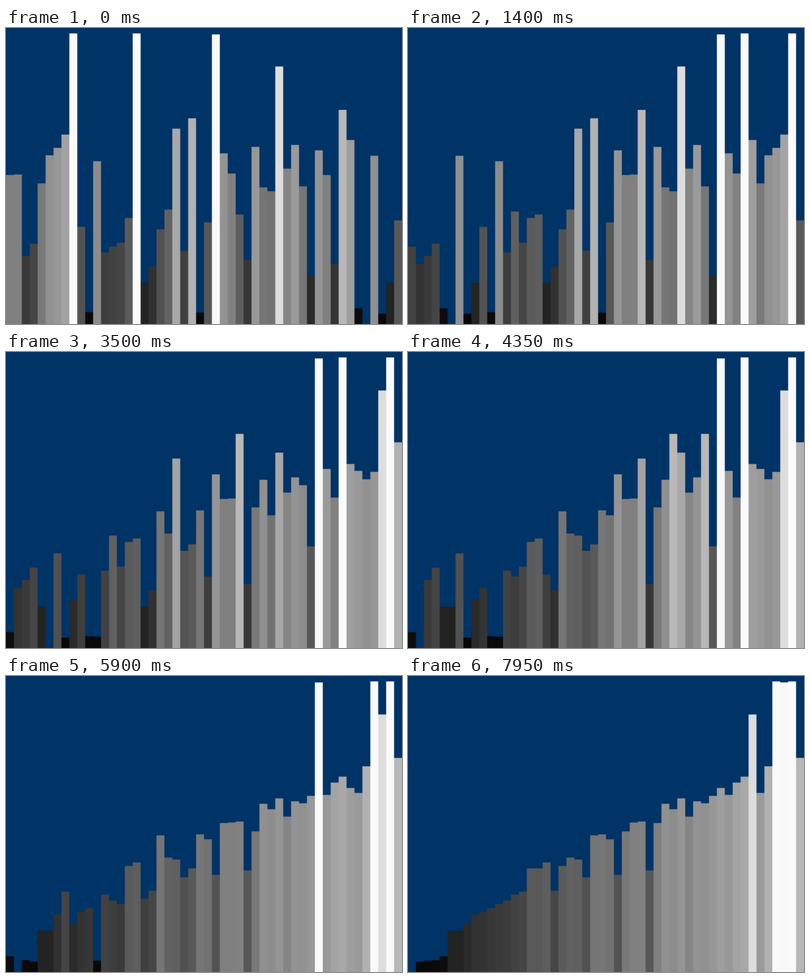
These frames come from a looping animation (740x555 px, 8000 ms). A matplotlib script:

```python
import numpy as np
import matplotlib.pyplot as plt
from matplotlib.animation import FuncAnimation

WIDTH, HEIGHT, DPI = 740, 555, 100
FRAMES, INTERVAL = 160, 50
STEP, LEAD = 40, 20    # ms per sorting operation, ms already elapsed at start
BAR, ROWS = 16, 600    # the scene is painted at 800 x 600, then scaled down
SKY = (0, 51, 102)

# The unsorted input; every later picture follows from the algorithm.
START = [302, 303, 138, 163, 285, 342, 357, 384, 589, 197, 24, 330, 145,
         157, 165, 215, 589, 84, 117, 192, 232, 396, 149, 417, 23, 206,
         587, 346, 305, 222, 130, 359, 277, 269, 522, 315, 363, 279, 99,
         352, 228, 122, 434, 373, 32, 0, 341, 21, 84, 210]


def knuth_gaps(size):
    """Gaps 1, 4, 13, 40, ... below size, largest first."""
    gaps = [1]
    while 3 * gaps[0] + 1 < size:
        gaps.insert(0, 3 * gaps[0] + 1)
    return gaps


def shell_sort(values):
    """Yield the array after every comparison, shift, placement and gap."""
    a = list(values)
    for gap in knuth_gaps(len(a)):
        for start in range(gap):
            for i in range(start + gap, len(a), gap):
                item, j = a[i], i
                while j >= gap and a[j - gap] > item:
                    a[j] = a[j - gap]
                    j -= gap
                    yield a[:]
                a[j] = item
                yield a[:]
        yield a[:]


def paint(values):
    """Bars whose brightness follows their height, in front of the sky."""
    heights = np.repeat(values, BAR)
    inside = np.arange(ROWS)[::-1, None] < heights
    gray = heights * 255 // ROWS
    return np.where(inside[..., None], gray[:, None], SKY).astype(np.uint8)


states = list(shell_sort(START))

fig = plt.figure(figsize=(WIDTH / DPI, HEIGHT / DPI), dpi=DPI)
ax = fig.add_axes([0, 0, 1, 1])
ax.axis("off")
picture = ax.imshow(paint(START), aspect="auto", interpolation="bicubic")


def draw(frame):
    step = (frame * INTERVAL + LEAD) // STEP
    picture.set_data(paint(states[step]))
    return [picture]


anim = FuncAnimation(fig, draw, frames=FRAMES, interval=INTERVAL,
                     init_func=lambda: draw(0), repeat=True, repeat_delay=0)
plt.show()
```
